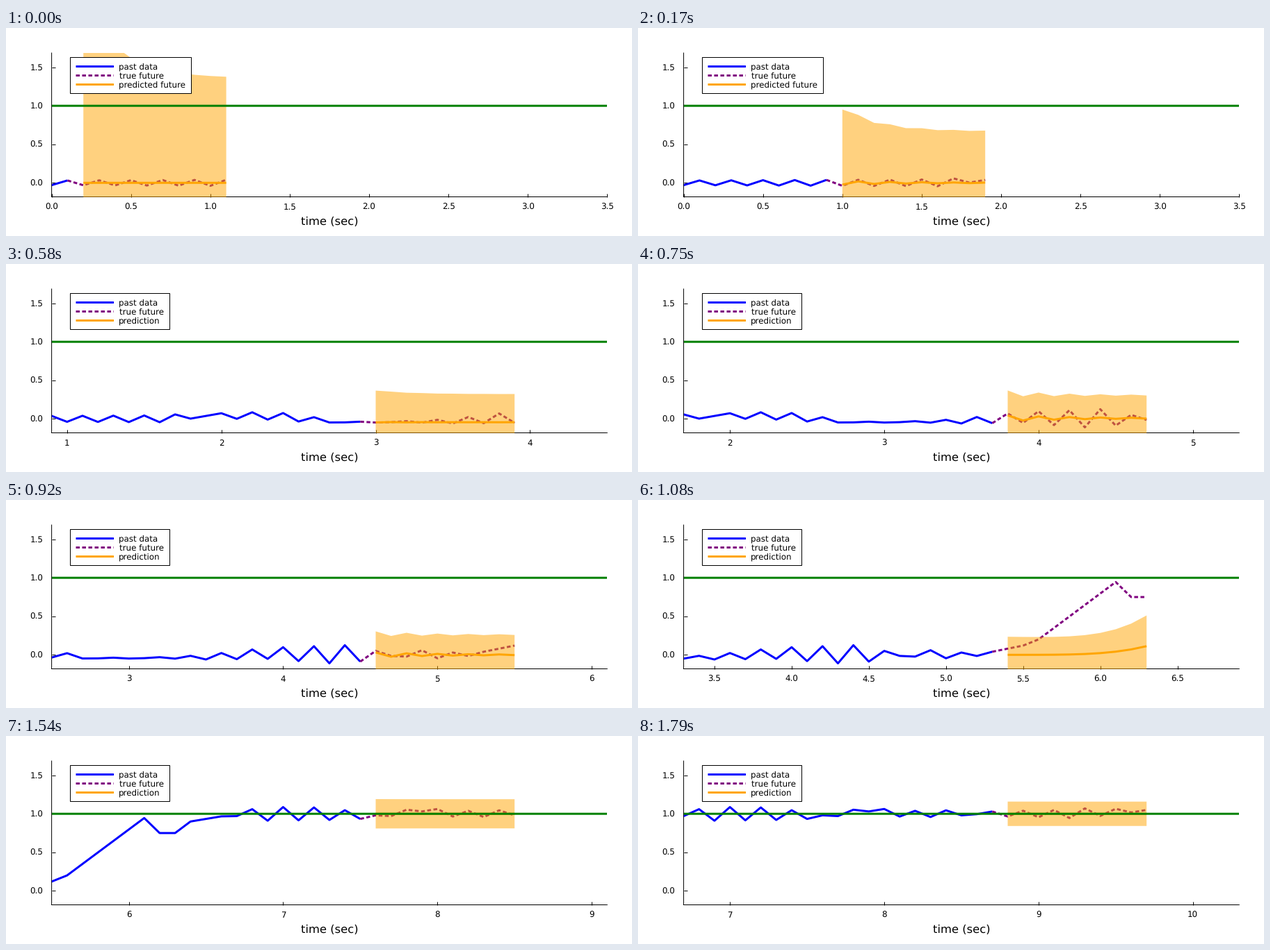
A matplotlib script for the animation above (1830 ms loop, 900x300 px).

```python
import matplotlib.pyplot as plt
import numpy as np
from matplotlib.animation import FuncAnimation
from matplotlib.patches import Rectangle

W, H, DPI = 900, 300, 100
PX = 72 / DPI  # points per pixel
TICKS_PER_LOOP = 183  # 10 ms each; the picture advances at 24 fps
HORIZON = 10

plt.rcParams.update({
    "font.family": "DejaVu Sans",
    "font.size": 11.9 * PX,
    "text.hinting": "none",
    "axes.linewidth": PX,
})


def curve(x, *points):
    """Piecewise linear curve through (x, y) key points."""
    return np.interp(x, *zip(*points))


def trend(t):
    """Step response from 0 to 1 with a dip on the way."""
    return curve(t, (5.2, 0), (5.5, .12), (5.6, .2), (6.1, .945),
                 (6.2, .75), (6.3, .75), (6.4, .9), (6.7, 1))


def zigzag(t):
    """Signed size of the sample-to-sample alternation."""
    return curve(t, (0, -.03), (1.7, -.045), (2.1, .045), (2.5, .045),
                 (2.9, -.01), (3.4, .02), (4.4, .125), (4.9, -.06),
                 (5.3, 0), (6.6, 0), (6.9, .09), (7.3, .08), (7.6, .02),
                 (8.4, .045), (8.7, -.03), (9.3, -.06), (9.7, -.01))


def drift(t):
    """Slow wander around the trend."""
    return curve(t, (1.6, 0), (2, .05), (2.4, .03), (2.8, -.05), (3.5, -.03),
                 (3.9, .02), (4.4, 0), (7.3, 0), (7.6, -.04), (7.9, .06),
                 (8.1, 0), (9.2, 0), (9.6, .04))


index = np.arange(98)
time = index / 10
signal = trend(time) + drift(time) + (-1.0) ** index * zigzag(time)


def forecast(step, start):
    """Mean and half-width of the prediction that begins at time start."""
    i = np.arange(HORIZON)
    level = np.clip((step - 26) / 3, 0, 1)
    surge = 1.5 * np.exp(-((step - 27.5) / 1.8) ** 2)
    flare = surge * (i / (HORIZON - 1)) ** 4

    goal = level + (1 - level) * drift(start)
    swing = .6 * min(1, step / 4) * (1 - level) * zigzag(start)
    mean = (goal + level * (trend(start) - goal) * np.exp(-i / 1.2)
            + swing * (-.8) ** i + .15 * flare)

    width = np.exp(curve(step, *((k, np.log(w)) for k, w in (
        (0, 1.36), (4, .67), (10, .445), (18, .3), (26, .228), (31, .227), (43, .158)))))
    early = .75 * np.exp(-step / 8 - i / 2.2)
    return mean, width * (1 + early + flare)


fig = plt.figure(figsize=(W / DPI, H / DPI), dpi=DPI, facecolor="white")

X0, X1, Y_TOP, Y_BOTTOM = 65.6, 864.3, 36, 243.5
ZERO, UNIT = 223.3, 111.1  # pixel row of value 0, pixels per unit
ax = fig.add_axes([X0 / W, 1 - Y_BOTTOM / H, (X1 - X0) / W, (Y_BOTTOM - Y_TOP) / H],
                  facecolor="none")
ax.set_ylim((ZERO - Y_BOTTOM) / UNIT, (ZERO - Y_TOP) / UNIT)
ax.set_yticks([0, .5, 1, 1.5], ["0.0", "0.5", "1.0", "1.5"])
ax.set_axisbelow(True)
ax.spines[["top", "right"]].set_visible(False)
for side in ("left", "bottom"):
    ax.spines[side].set(zorder=.6, snap=False)
ax.tick_params(direction="in", length=5 * PX, width=PX)
ax.tick_params(axis="x", pad=9 * PX)
ax.tick_params(axis="y", pad=12.2 * PX)

PAST = dict(color="blue")
TRUE = dict(color="purple", ls=(0, (5.5 / 3, 3.5 / 3)), dash_capstyle="butt")
PRED = dict(color="orange")
COMMON = dict(lw=3 * PX, snap=False, solid_capstyle="butt",
              solid_joinstyle="round", dash_joinstyle="round")

past, = ax.plot([], [], zorder=2, **PAST, **COMMON)
future, = ax.plot([], [], zorder=3, **TRUE, **COMMON)
band, = ax.fill([0, 0, 1], [0, 1, 1], color="orange", alpha=.5, lw=0, zorder=4)
mean_line, = ax.plot([], [], zorder=5, **PRED, **COMMON)
ax.axhline(1, color="green", zorder=6, **COMMON)

# Overlay in pixel coordinates for the legend and the axis title.
ui = fig.add_axes([0, 0, 1, 1])
ui.set(xlim=(0, W), ylim=(H, 0))
ui.axis("off")
ui.text(465.5, 284, "time (sec)", size=16.35 * PX, ha="center")
box = Rectangle((92.5, 42.5), 174, 52, fc="white", ec="black", lw=PX, snap=False)
ui.add_patch(box)
labels = []
for row, (x, name, style) in enumerate([(162, "past data", PAST),
                                        (163, "true future", TRUE),
                                        (162, "predicted future", PRED)]):
    y = 55.5 + 13 * row
    ui.plot([100.5, 155], [y, y], **style, **COMMON)
    labels.append(ui.text(x, 60 + 12.7 * row, name))


def set_window(now, scrolling):
    lo, hi = (now - 2, now + 1.6) if scrolling else (0, 3.5)
    whole = np.arange(np.ceil(lo), np.floor(hi) + 1)
    if scrolling and len(whole) >= 4:
        ticks, fmt = whole, "{:.0f}"
    else:
        ticks, fmt = np.arange(np.ceil(lo * 2), np.floor(hi * 2) + 1) / 2, "{:.1f}"
    ax.set_xticks(ticks, [fmt.format(v) for v in ticks])
    ax.set_xlim(lo, hi)


def update(tick):
    step = (12 * (2 * tick + 1) - 1) // 100
    n = 1 + 2 * step
    scrolling = step >= 10
    set_window(time[n], scrolling)

    past.set_data(time[:n + 1], signal[:n + 1])
    future.set_data(time[n:n + HORIZON + 1], signal[n:n + HORIZON + 1])

    t = time[n + 1:n + HORIZON + 1]
    mean, half = forecast(step, t[0])
    mean_line.set_data(t, mean)
    band.set_xy(np.column_stack([np.r_[t, t[::-1]],
                                 np.r_[mean + half, (mean - half)[::-1]]]))

    labels[2].set_text("prediction" if scrolling else "predicted future")
    box.set_width(143 if scrolling else 174)
    return past, future, band, mean_line


anim = FuncAnimation(fig, update, frames=TICKS_PER_LOOP, interval=10,
                     repeat=True, repeat_delay=0, blit=False)
plt.show()
```
